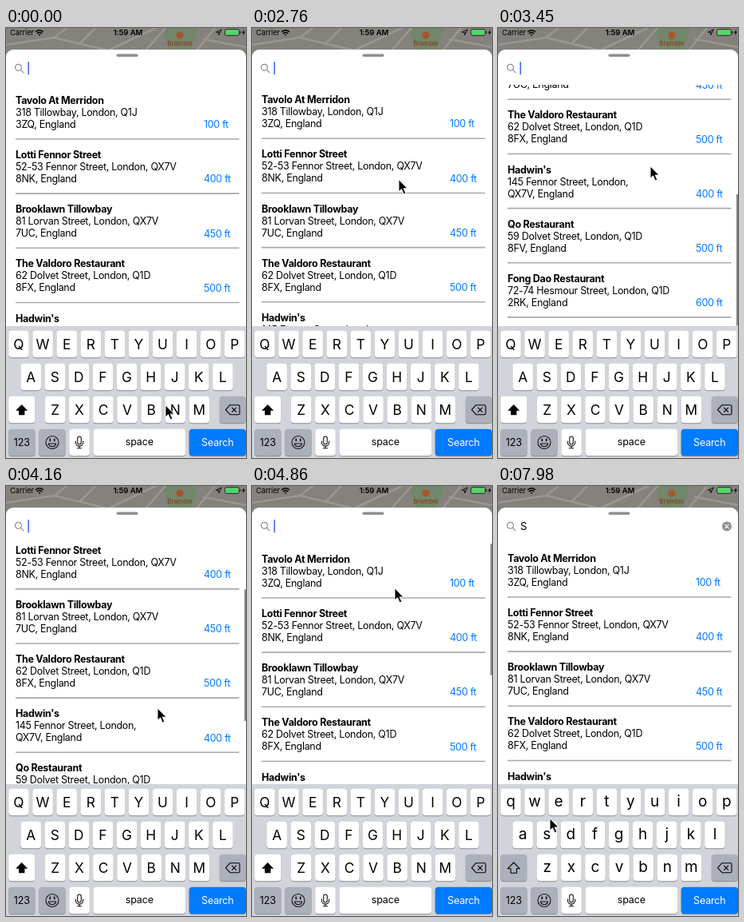
Recreate the animation shown at these times as an HTML page with a canvas. Size 301 by 538 pixels, loop 8 s.

```html
<!DOCTYPE html>
<html lang="en">
<head>
<meta charset="utf-8">
<title>Restaurant search</title>
<style>
html, body { margin: 0; width: 100%; height: 100%; overflow: hidden; background: #fff; }
canvas { display: block; width: 301px; height: 538px; }
</style>
</head>
<body>
<canvas id="stage"></canvas>
<script>
const W = 301, H = 538, LOOP = 8000;
const canvas = document.getElementById('stage');
const dpr = window.devicePixelRatio || 1;
canvas.width = W * dpr;
canvas.height = H * dpr;
const c = canvas.getContext('2d');

const BLUE = '#007aff', GRAY = '#8e8e93', KEY_GRAY = '#abb0ba';
const KEY_H = 33.5, STEP = 30.1;
const ROWS = [
  ['Tavolo At Merridon', '318 Tillowbay, London, Q1J', '3ZQ, England', '100 ft'],
  ['Lotti Fennor Street', '52-53 Fennor Street, London, QX7V', '8NK, England', '400 ft'],
  ['Brooklawn Tillowbay', '81 Lorvan Street, London, QX7V', '7UC, England', '450 ft'],
  ['The Valdoro Restaurant', '62 Dolvet Street, London, Q1D', '8FX, England', '500 ft'],
  ["Hadwin's", '145 Fennor Street, London,', 'QX7V, England', '400 ft'],
  ['Qo Restaurant', '59 Dolvet Street, London, Q1D', '8FV, England', '500 ft'],
  ['Fong Dao Restaurant', '72-74 Hesmour Street, London, Q1D', '2RK, England', '600 ft'],
];

// Keys: [time, value, ...]
const POINTER = [
  [0, 200, 472], [800, 187, 405], [1100, 187, 405], [1770, 188, 301], [1900, 188, 301],
  [2400, 184, 192], [2640, 184, 192], [2760, 184, 190], [3050, 187, 110], [3450, 191, 173],
  [3560, 191, 175], [4160, 190, 278], [4330, 189, 286], [4860, 179, 128], [5230, 180, 129],
  [5940, 64, 436], [7650, 64, 436], [7980, 65, 416], [LOOP, 65, 416],
];
const SCROLL = [
  [2740, 0], [3050, 85], [3250, 155], [3450, 186], [3530, 186], [3850, 142],
  [4160, 78.5], [4400, 22], [4640, -7], [4860, -1], [5000, 0],
];
const CARET = [
  [0, 1], [580, 1], [680, 0], [1110, 0], [1200, 1], [1620, 1], [1710, 0], [2150, 0], [2240, 1],
  [5560, 1], [5650, 0], [6065, 0], [6155, 1], [6605, 1], [6695, 0], [7055, 0], [7145, 1],
  [7690, 1], [7790, 0],
];
const SCROLLBAR = [[2760, 0], [2860, 1], [5020, 1], [5220, 0]];

function slope(keys, i, n) {
  const a = keys[i - 1], b = keys[i], d = keys[i + 1];
  if (!a || !d || (b[n] - a[n]) * (d[n] - b[n]) <= 0) return 0;
  return (d[n] - a[n]) / (d[0] - a[0]);
}

// Smooth curve through the keys, at rest at every turning point
function track(keys, t, n = 1) {
  const i = keys.findIndex(k => k[0] > t);
  if (i === 0) return keys[0][n];
  if (i < 0) return keys[keys.length - 1][n];
  const a = keys[i - 1], b = keys[i], d = b[0] - a[0];
  const u = (t - a[0]) / d, v = 1 - u;
  return v * v * (1 + 2 * u) * a[n] + u * u * (3 - 2 * u) * b[n]
    + d * u * v * (v * slope(keys, i - 1, n) - u * slope(keys, i, n));
}

function rect(x, y, w, h, color, r = 0) {
  c.fillStyle = color;
  c.beginPath();
  c.roundRect(x, y, w, h, r);
  c.fill();
}

function text(str, x, y, size, { color = '#000', weight = 400, align = 'left', spacing = 0 } = {}) {
  c.font = `${weight} ${size}px Inter, sans-serif`;
  c.letterSpacing = spacing + 'px';
  c.textAlign = align;
  c.fillStyle = color;
  c.fillText(str, x, y);
}

function shape(d, x, y, { fill, stroke, width = 1.2 } = {}) {
  const path = new Path2D(d);
  c.save();
  c.translate(x, y);
  c.lineJoin = c.lineCap = 'round';
  if (fill) { c.fillStyle = fill; c.fill(path); }
  if (stroke) { c.strokeStyle = stroke; c.lineWidth = width; c.stroke(path); }
  c.restore();
}

function drawStatusBar() {
  rect(0, 0, W, 45, '#85827d');
  shape('M196 0H241L232 27H205Z', 0, 0, { fill: '#71866a' });
  shape('M0 21L60 12L128 28M60 12L76 0M92 20L112 0M130 27L188 0M176 27L200 0M240 27L262 0M248 14L301 24',
    0, 0, { stroke: '#9a9792', width: 2.5 });
  shape('M218 4.5a4.5 4.5 0 1 0 .01 0', 0, 0, { fill: '#a6552c' });
  text('Bramble', 218, 22, 8, { color: '#84441f', weight: 500, align: 'center' });

  text('Carrier', 5, 9, 9.4, { spacing: -.1 });
  shape('M-4.5 -2.5Q0 -6 4.5 -2.5M-2.7 -.4Q0 -2.6 2.7 -.4', 42, 7, { stroke: '#000', width: 1.5 });
  shape('M-1.5 1.3Q0 0 1.5 1.3L0 3Z', 42, 7, { fill: '#000' });
  text('1:59 AM', 153, 9, 9.6, { weight: 600, align: 'center', spacing: -.1 });
  shape('M3 -3.5L-3.5 -.2H-.2V3Z', 267, 5.5, { stroke: '#000', width: .9 });
  c.strokeStyle = '#222';
  c.lineWidth = .8;
  c.beginPath();
  c.roundRect(274.5, 1.5, 18, 8, 2);
  c.stroke();
  rect(275.5, 2.5, 16, 6, '#4cd964', 1);
  rect(293.3, 4, 1.2, 3, '#222', .5);
  shape('M1 -4L-2 .7H-.2L-1 4L2 -.8H.2Z', 298, 5.5, { fill: '#000' });
}

function drawSearch(t, typed) {
  rect(0, 27, W, 360, '#fff', 9);
  rect(138.5, 32.5, 27, 3.6, GRAY, 1.8);
  shape('M4 0A4 4 0 1 1 -4 0A4 4 0 1 1 4 0M3 3L6.5 6.5', 15.5, 49.3, { stroke: GRAY, width: 1.2 });
  if (typed) {
    text('S', 28, 55.3, 13.2);
    shape('M6 0A6 6 0 1 1 -6 0A6 6 0 1 1 6 0', 287, 50.5, { fill: GRAY });
    shape('M-2.3 -2.3L2.3 2.3M2.3 -2.3L-2.3 2.3', 287, 50.5, { stroke: '#fff', width: 1.1 });
  }
  c.globalAlpha = track(CARET, t);
  rect(typed ? 37 : 27.4, 42, 1.6, 16.5, '#426bf2', .8);
  c.globalAlpha = 1;
}

function drawList(t) {
  const scroll = track(SCROLL, t);
  c.save();
  c.beginPath();
  c.rect(0, 71, W, 302);
  c.clip();
  ROWS.forEach(([name, street, area, distance], i) => {
    const y = 95 + 68.15 * i - scroll;
    text(name, 12, y, 12.5, { weight: 700, spacing: -.3 });
    text(street, 12, y + 15, 12.5, { spacing: -.3 });
    text(area, 12, y + 30, 12.5, { spacing: -.3 });
    text(distance, 248, y + 30.2, 12.5, { color: BLUE, spacing: -.3 });
    rect(12, y + 43.2, 280.5, 1.6, '#a9a9a9');
  });
  c.globalAlpha = track(SCROLLBAR, t);
  rect(299, 72 + .73 * Math.max(0, scroll), 2, 165, '#85858a', 1);
  c.restore();
}

function key(x, y, w, color = '#fff') {
  rect(x, y + 1, w, KEY_H, '#898b8f', 4);
  rect(x, y, w, KEY_H, color, 4);
}

function drawKeyboard(lower, pressed) {
  rect(0, 373, W, 165, '#d1d4da');
  [['QWERTYUIOP', 3.2], ['ASDFGHJKL', 18.4], ['ZXCVBNM', 49]].forEach(([letters, left], row) => {
    const y = 378.7 + 41 * row;
    [...letters].forEach((letter, i) => {
      const x = left + STEP * i;
      key(x, y, 25.5);
      if (pressed && letter === 'S') return;
      text(lower ? letter.toLowerCase() : letter, x + 12.75, y + (lower ? 21.8 : 23.1),
        lower ? 19 : 17.3, { align: 'center' });
    });
  });

  key(3.2, 460.7, 33, lower ? KEY_GRAY : '#fff');
  shape('M0 -7L7.5 .8H3.7V6.2H-3.7V.8H-7.5Z', 19.7, 478,
    lower ? { stroke: '#000', width: 1.1 } : { fill: '#000' });
  key(267.8, 460.7, 33, KEY_GRAY);
  shape('M-9 0L-3.5 -6H7Q8.5 -6 8.5 -4.5V4.5Q8.5 6 7 6H-3.5ZM-1 -2.6L4.2 2.6M4.2 -2.6L-1 2.6',
    284.5, 477.7, { stroke: '#000', width: 1.1 });

  const y = 501.7, label = { align: 'center', spacing: -.2 };
  key(3.2, y, 33.3, KEY_GRAY);
  text('123', 19.8, 522.8, 12.6, label);
  key(41.3, y, 33.3, KEY_GRAY);
  shape('M8 0A8 8 0 1 1 -8 0A8 8 0 1 1 8 0M-4.7 1.5H4.7Q3.8 5.2 0 5.2T-4.7 1.5', 58, 518.5,
    { stroke: '#111', width: 1.1 });
  shape('M-2.7 -4.2V-2M2.7 -4.2V-2', 58, 518.5, { stroke: '#111', width: 1.7 });
  key(79.3, y, 25.5);
  shape('M-2.3 -5.2A2.3 2.3 0 0 1 2.3 -5.2V0A2.3 2.3 0 0 1 -2.3 0Z'
    + 'M-4.6 -1.5V0A4.6 4.6 0 0 0 4.6 0V-1.5M0 4.6V7.3M-2.7 7.3H2.7', 92, 518.5, { stroke: '#111', width: 1.1 });
  key(109.5, y, 115.5);
  text('space', 167.3, 522.3, 12.6, label);
  key(229.7, y, 71.3, BLUE);
  text('Search', 265.3, 522.8, 12.6, { ...label, color: '#fff' });

  if (pressed) {
    shape('M43 367H81Q87 367 87 373V402C87 412 74 412 74 424V449Q74 453 70 453H53Q49 453 49 449'
      + 'V424C49 412 37 412 37 402V373Q37 367 43 367Z', 0, 0, { fill: '#fff', stroke: '#b9bcc2', width: .7 });
    text('S', 61.5, 401, 28, { align: 'center' });
  }
}

function draw(t) {
  const typed = t >= 7330;
  c.setTransform(dpr, 0, 0, dpr, 0, 0);
  drawStatusBar();
  drawSearch(t, typed);
  drawList(t);
  drawKeyboard(typed, t >= 7090 && t < 7420);
  shape('M0 0V15L3.5 11.8L6.2 18L8.9 16.8L6.2 11H10.8Z', track(POINTER, t, 1), track(POINTER, t, 2),
    { fill: '#000', stroke: '#fff', width: 1 });
}

function frame() {
  draw(performance.now() % LOOP);
  requestAnimationFrame(frame);
}
frame();
</script>
</body>
</html>
```
